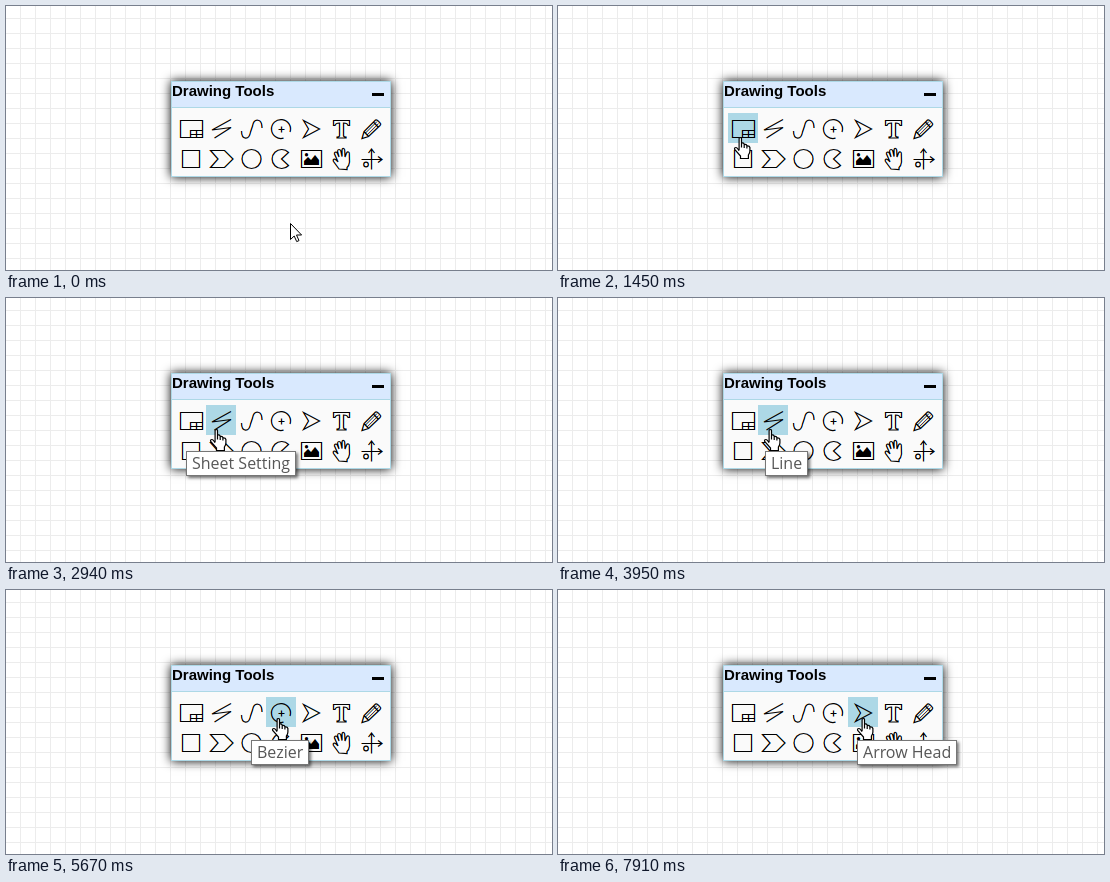
An HTML page that plays this animation: 546x264 px, repeating every 7.99 s.

```html
<!DOCTYPE html>
<html lang="en">
<head>
<meta charset="utf-8">
<title>Drawing Tools</title>
<style>
  html, body { margin: 0; width: 100%; height: 100%; overflow: hidden; }
  body {
    position: relative;
    background: linear-gradient(#ececec 1px, transparent 1px) 0 12px / 15px 15px,
                linear-gradient(90deg, #ececec 1px, transparent 1px) 14px 0 / 15px 15px, #fff;
  }
  #panel {
    position: absolute; left: 165px; top: 75px; width: 220px; height: 96px; box-sizing: border-box;
    background: #fafafa; border: 1px solid #add8e6; box-shadow: 0 0 10px #000;
  }
  #title {
    height: 26px; background: #d9e9fe; border-bottom: 1px solid #add8e6;
    box-sizing: border-box; font: bold 15px/18px "Liberation Sans", Arial, sans-serif; color: #000;
  }
  #minus { position: absolute; left: 200px; top: 11px; width: 12px; height: 3px; background: #000; }
  svg { position: absolute; left: 0; top: 0; }
  use { mix-blend-mode: multiply; }
  #tip {
    position: absolute; box-sizing: border-box; height: 25px; padding: 0 5px;
    border: 1px solid #767676; background: #fff; box-shadow: 2px 2px 3px #0008;
    font: 16px/23px "Open Sans", "Noto Sans", sans-serif; color: #575757; white-space: nowrap;
  }
</style>
</head>
<body>
<div id="panel"><div id="title">Drawing Tools</div><div id="minus"></div></div>

<svg width="546" height="264">
  <defs>
    <g id="icons" fill="none" stroke="currentColor" stroke-width="1.2">
      <!-- sheet, line, bezier, arc, arrow head, text, pencil -->
      <path d="M174.500 114.500h22v17h-22zM184.500 131.500v-7h12M184.500 128.500h12M190.500 124.500v7"/>
      <path d="M225 113.500L206 124L225 121.500L208.500 132"/>
      <path d="M235.500 125C235.500 134 243 134.500 244.500 126L246.500 120C248 112 256 112 256 122"/>
      <path d="M277.500 132.200A9.500 9.500 0 1 1 284 126M275.500 120.500v6M272.500 123.500h6"/>
      <path d="M297.500 114.500L313.500 123L297.500 131.500L302.500 123z"/>
      <path d="M327.500 114.500h16v5h-1.500q-.5-2.500-4.500-2.500v12.500q0 1.500 2.500 1.500v1h-9v-1q2.500 0 2.500-1.500v-12.500q-4 0-4.500 2.500h-1.500z"/>
      <path d="M356 132.500L358 125.500L369.500 114Q371 113 374.500 117.500Q375 118.500 374 119.500L362.500 130.500zM358 125.500L362.500 130.500M367.500 116L372 121"/>
      <path stroke-width=".9" d="M359.500 127L371 115.500M361 129L372.500 117.500"/>
      <!-- rectangle, polygon, circle, pie, image, pan, axes -->
      <path d="M176.500 144.500h17v17h-17z"/>
      <path d="M204.500 144.500h14L227 153L218.500 161.500h-14L212 153z"/>
      <circle cx="245.500" cy="153" r="9.500"/>
      <path d="M275.500 153L282.500 146.500A9.500 9.500 0 1 0 282.500 159.500z"/>
      <path d="M295.500 144.500h20v17h-20z"/>
      <path fill="currentColor" stroke="none" d="M298 159v-4l4-4l3 3l4-5l4 5v5zM300.500 147a1.700 1.700 0 1 1 0 3.400a1.700 1.700 0 1 1 0-3.400z"/>
      <path d="M333 163L327.500 155.500q-1-2.500 1-2.500q1.500 .5 3.500 3L328.500 148q-.3-2 1.300-2q1.200 .2 1.700 1.500L333 151L331.500 145.500q0-2 1.500-2q1.300 0 1.800 1.500L336 150.500V144q.2-1.800 1.500-1.500q1.200 .3 1.200 2L339 151L340.500 147q.8-1.500 2-1q1.200 .5 .8 2.500L343.500 156q-.5 4-2.500 5.500V163.500z"/>
      <path d="M365.500 163.500V143.500M362.500 147L365.500 143L368.500 147M355.500 153.500H375.500M372 150.500L376 153.500L372 156.500"/>
      <circle cx="360" cy="158.500" r="2.300"/>
    </g>
  </defs>
  <rect id="hover" y="107" width="30" height="30" fill="#add8e6"/>
  <!-- one layer per subpixel -->
  <use href="#icons" x=".33" color="#0ff"/>
  <use href="#icons" color="#f0f"/>
  <use href="#icons" x="-.33" color="#ff0"/>
</svg>

<div id="tip"></div>

<svg width="546" height="264" stroke="#000" fill="#fff">
  <path id="arrow" d="M.5 .5V16.500L4.200 13L6.700 18.600L9 17.600L6.500 12H11.600z"/>
  <path id="hand" stroke-width="1.200" d="M-.9 13V1.500q0-1 1.200-1t1.200 1V6q2.500-.5 2.700 1.500q2.500-.5 2.700 1.500q2.600-.3 3 1.500V14q0 2-1.500 4V21.500H.5V19L-5.300 12.500q-.7-2 1.300-2q1 0 3.100 3.200M1.500 6v4.500M4.200 7.500v3.500M6.900 9v2.500"/>
  <circle id="click" cx="284.500" cy="217.500" r="12" fill="#ff0" fill-opacity=".47" stroke="none"/>
</svg>

<script>
const LOOP = 7990;
const START = [284, 217];

// first step time, last step time, steps, end point, optional bend
const moves = [
  [830, 1450, 9, [182, 131], [105, 165]],
  [2620, 2620, 1, [198, 131]],
  [2700, 2700, 1, [199, 131]],
  [2850, 2850, 1, [205, 131]],
  [2940, 2940, 1, [210, 131]],
  [3950, 4420, 7, [247, 129]],
  [5350, 5670, 5, [272, 128]],
  [6510, 6820, 5, [301, 128]],
  [7910, 7910, 1, [305, 128]]
];

// first step time, last step time, fade steps, text, left, top
const tips = [
  [1920, 2070, 3, 'Sheet Setting', 180, 153],
  [3320, 3410, 2, 'Line', 207, 153],
  [4740, 4740, 1, 'Bezier', 245, 150],
  [5980, 6050, 2, 'Arc', 270, 150],
  [7220, 7220, 1, 'Arrow Head', 299, 150]
];

const $ = id => document.getElementById(id);
const show = (el, on) => { el.style.display = on ? '' : 'none'; };

// Stepped progress: 1/n at the first step, 1 at the last.
function progress(t, first, last, n) {
  if (t < first) return 0;
  if (t >= last) return 1;
  return (Math.floor((t - first) / (last - first) * (n - 1) + 0.02) + 1) / n;
}

function pointer(t) {
  let pos = START;
  for (const [first, last, n, end, bend] of moves) {
    if (t < first) break;
    const p = progress(t, first, last, n);
    const ease = p * p * (3 - 2 * p);
    pos = pos.map((v, i) => bend
      ? (1 - p) ** 2 * v + 2 * p * (1 - p) * bend[i] + p * p * end[i]
      : v + (end[i] - v) * ease);
  }
  return pos.map(Math.round);
}

function draw(t) {
  const [x, y] = pointer(t);
  const cell = Math.floor((x - 170) / 30);
  const over = cell >= 0 && cell < 7 && y >= 107 && y < 137;
  show($('hover'), over);
  $('hover').setAttribute('x', 170 + 30 * cell);
  show($('hand'), over);
  show($('arrow'), !over);
  $(over ? 'hand' : 'arrow').setAttribute('transform', `translate(${x} ${y})`);
  show($('click'), t >= 450 && t < 830);

  const tip = tips.filter(item => t >= item[0]).pop();
  show($('tip'), tip);
  if (tip) {
    const [first, last, n, text, left, top] = tip;
    $('tip').textContent = text;
    Object.assign($('tip').style, {
      left: left + 'px', top: top + 'px', opacity: progress(t, first, last, n)
    });
  }
}

const begin = performance.now();
function tick() {
  draw((performance.now() - begin) % LOOP);
  requestAnimationFrame(tick);
}
tick();
</script>
</body>
</html>
```
